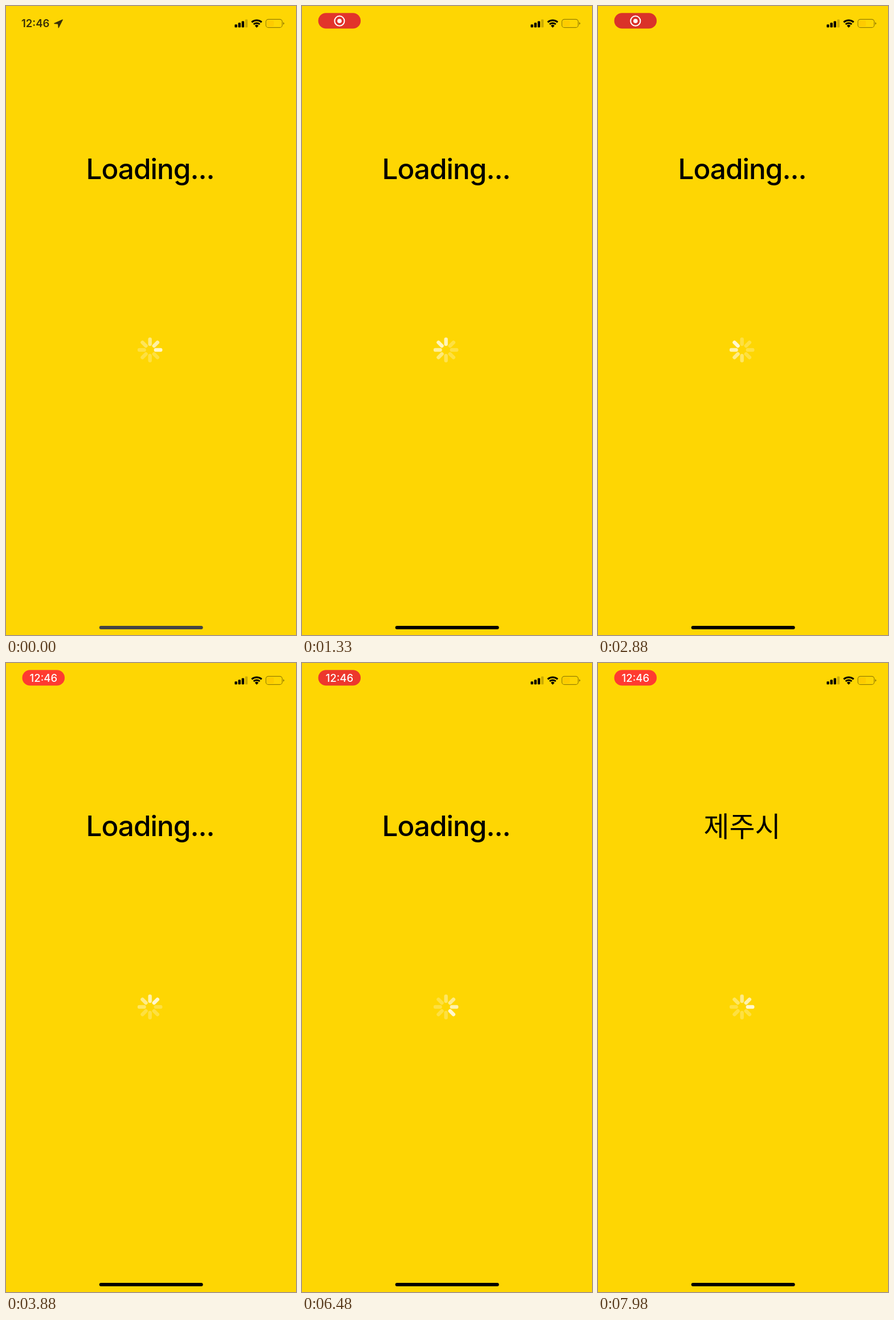
An HTML page for the animation above (8 s loop, 509 by 1101 pixels).

```html
<!DOCTYPE html>
<html lang="en">
<head>
<meta charset="utf-8">
<title>Loading</title>
<style>
  html, body { margin: 0; width: 100%; height: 100%; overflow: hidden; background: #fed603; }
  svg { display: block; width: 100%; height: 100%; }
  text { font-family: Inter, "Noto Sans", sans-serif; }
  .title { font-size: 49.5px; font-weight: 500; letter-spacing: -1px; text-anchor: middle; }
  .city { font: 400 49px "Noto Sans CJK KR", "Noto Sans CJK", sans-serif; text-anchor: middle; }
</style>
</head>
<body>
<svg viewBox="0 0 509 1101">
  <rect width="509" height="1101" fill="#fed603"/>

  <g id="plainClock" fill="#3a3008">
    <text x="27" y="37.2" font-size="18.5" font-weight="600">12:46</text>
    <path d="M99.3 24 84.8 30.6 91.6 31.2 92.2 38Z" stroke="#3a3008" stroke-width="1.2" stroke-linejoin="round"/>
  </g>

  <g id="pill">
    <rect id="pillBody" x="28.5" y="12.3" width="74.5" height="27.2" rx="13.6"/>
    <g id="recordIcon">
      <circle cx="65.8" cy="26.2" r="8.6" fill="none" stroke="#fff" stroke-width="2"/>
      <circle cx="65.8" cy="26.2" r="3.8" fill="#fff"/>
    </g>
    <text id="pillClock" x="65.8" y="32.8" font-size="18.5" font-weight="500" fill="#fff" text-anchor="middle">12:46</text>
  </g>

  <g id="signal"></g>
  <g id="wifi" fill="none" stroke="#000">
    <path d="M431.3 28.3A13 13 0 0 1 448.7 28.3" stroke-width="3.1"/>
    <path d="M434.6 32A8 8 0 0 1 445.4 32" stroke-width="3"/>
    <path d="M440 38 436.7 34.4A4.8 4.8 0 0 1 443.3 34.4Z" fill="#000" stroke="none"/>
  </g>
  <g id="battery">
    <rect x="456.2" y="23.4" width="28.6" height="14.2" rx="4.2" fill="none" stroke="#000" stroke-opacity=".4" stroke-width="1.2"/>
    <rect x="458.2" y="25.4" width="12" height="10.2" rx="2.4" fill="#fecb00"/>
    <path d="M486.5 28.2Q488.4 29 488.4 30.5T486.5 32.8Z" fill-opacity=".45"/>
  </g>

  <text id="loading" class="title" x="253" y="303">Loading...</text>
  <text id="city" class="city" x="253" y="303.5" lang="ko">제주시</text>
  <g id="spinner" transform="translate(252.7 602)" fill="#fff"></g>
  <rect id="homeBar" x="163.7" y="1085" width="182" height="6" rx="3"/>
</svg>
<script>
const LOOP = 8000;
const SPOKES = 8;
const STEP = 100;
const HEAD_START = 2.85;
const CITY_AT = 7250;

const $ = id => document.getElementById(id);
const clamp = v => Math.min(1, Math.max(0, v));
const ease = (t, from, to) => {
  const u = clamp((t - from) / (to - from));
  return u * u * (3 - 2 * u);
};

function addRect(parent, attrs) {
  const rect = document.createElementNS("http://www.w3.org/2000/svg", "rect");
  for (const key in attrs) rect.setAttribute(key, attrs[key]);
  return parent.appendChild(rect);
}

for (let i = 0; i < 4; i++) {
  const height = 5.4 + i * 2.9;
  addRect($("signal"), {
    x: 401.4 + i * 6.1, y: 37.6 - height, width: 4.4, height, rx: 1.3,
    "fill-opacity": i < 3 ? 1 : 0.2
  });
}

const spokes = Array.from({ length: SPOKES }, (_, i) =>
  addRect($("spinner"), {
    x: -3.2, y: -21.8, width: 6.4, height: 14.8, rx: 3,
    transform: `rotate(${i * 360 / SPOKES})`
  }));

// Each spoke lights as the head reaches it, then fades over half a turn.
function spokeOpacity(age) {
  const rise = clamp(age / 0.2);
  return 0.25 + 0.6 * rise * clamp(1 - Math.max(0, age - 0.4) / 4.2);
}

function render(t) {
  const head = HEAD_START + t / STEP;
  spokes.forEach((spoke, i) => {
    const age = (head - i + SPOKES) % SPOKES;
    spoke.setAttribute("opacity", spokeOpacity(age).toFixed(3));
  });

  const pillShown = ease(t, 120, 420);
  $("plainClock").setAttribute("opacity", 1 - ease(t, 60, 300));
  $("pill").setAttribute("opacity", pillShown);

  const glow = 0.925 + 0.075 * Math.cos(Math.PI * t / 1000);
  $("pillBody").setAttribute("fill", `rgb(${[255, 59, 48].map(c => Math.round(c * glow))})`);

  const clockShown = ease(t, 3080, 3380);
  $("recordIcon").setAttribute("opacity", 1 - clockShown);
  $("pillClock").setAttribute("opacity", clockShown);

  const gray = Math.round(68 * (1 - ease(t, 0, 300)));
  $("homeBar").setAttribute("fill", `rgb(${gray},${gray},${gray})`);

  const arrived = t >= CITY_AT;
  $("loading").setAttribute("visibility", arrived ? "hidden" : "visible");
  $("city").setAttribute("visibility", arrived ? "visible" : "hidden");
}

const start = performance.now();
function tick() {
  render((performance.now() - start) % LOOP);
  requestAnimationFrame(tick);
}
tick();
</script>
</body>
</html>
```
